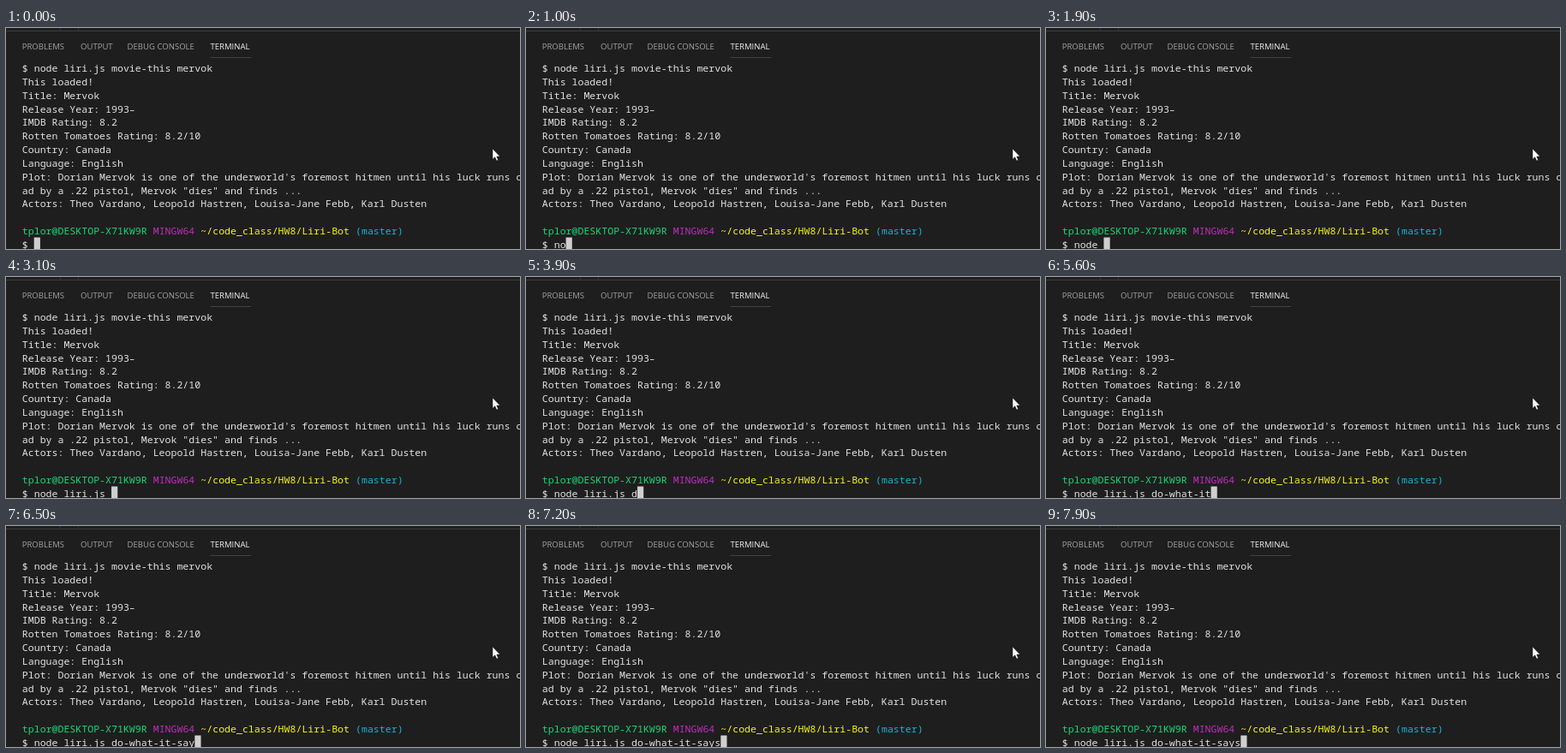
Write an HTML page that moves like this. It is 600 by 258 pixels and loops after 8000 ms.

```html
<!DOCTYPE html>
<html lang="en">
<head>
<meta charset="utf-8">
<title>Terminal</title>
<style>
  html, body { margin: 0; width: 100%; height: 100%; overflow: hidden; background: #1e1e1e; }
  svg { display: block; width: 600px; height: 258px; }
  text { white-space: pre; }
  .tabs { font: 9.55px "Open Sans", "Noto Sans", sans-serif; fill: #a4a4a4; }
  .tabs .active { fill: #f4f4f4; }
  .term { font: 11.583px "Noto Sans Mono", "DejaVu Sans Mono", monospace; fill: #e2e2e2; }
</style>
</head>
<body>
<svg viewBox="0 0 600 258">
  <rect width="600" height="258" fill="#1e1e1e"/>
  <path d="M0 3.5H600" stroke="#3c3c3c"/>
  <path d="M63.5 0V3M84.5 0V3" stroke="#333"/>
  <g class="tabs">
    <text x="18.7" y="24.5">PROBLEMS</text>
    <text x="87" y="24.5">OUTPUT</text>
    <text x="141.6" y="24.5">DEBUG CONSOLE</text>
    <text x="238.5" y="24.5" class="active">TERMINAL</text>
  </g>
  <path d="M238.5 34.5H286" stroke="#424242"/>
  <g class="term" id="term"></g>
  <rect id="caret" y="244.5" width="7.2" height="14" fill="#cfcfcf"/>
  <path d="M568 141V153.3L570.8 150.7L572.7 155L574.6 154.2L572.8 150H576.6Z" fill="#fff" stroke="#111" stroke-width=".5"/>
</svg>
<script>
const LOOP = 8000, LEFT = 18.8, CHAR = 6.95, FIRST = 51.2, PITCH = 15.82;
const COMMAND = "node liri.js do-what-it-says";

// [time in ms, characters typed]
const TYPING = [[420, 0], [920, 2], [1740, 5], [1900, 5], [2620, 13], [3620, 13], [4620, 19], [6420, 27], [6650, 28], [LOOP, 28]];

const OUTPUT = [
  "$ node liri.js movie-this mervok",
  "This loaded!",
  "Title: Mervok",
  "Release Year: 1993–",
  "IMDB Rating: 8.2",
  "Rotten Tomatoes Rating: 8.2/10",
  "Country: Canada",
  "Language: English",
  "Plot: Dorian Mervok is one of the underworld's foremost hitmen until his luck runs out",
  "ad by a .22 pistol, Mervok \"dies\" and finds ...",
  "Actors: Theo Vardano, Leopold Hastren, Louisa-Jane Febb, Karl Dusten"
];
const PROMPT = [
  ["tplor@DESKTOP-X71KW9R", "#18d97a"],
  ["MINGW64", "#c02cc0"],
  ["~/code_class/HW8/Liri-Bot", "#f8f820"],
  ["(master)", "#1ab2d4"]
];

const term = document.getElementById("term");
const caret = document.getElementById("caret");

function addText(content, row, column = 0, color) {
  const el = document.createElementNS("http://www.w3.org/2000/svg", "text");
  el.setAttribute("x", LEFT + column * CHAR);
  el.setAttribute("y", Math.round(FIRST + row * PITCH));
  if (color) el.setAttribute("fill", color);
  el.textContent = content;
  return term.appendChild(el);
}

OUTPUT.forEach((line, row) => addText(line, row));
let column = 0;
for (const [part, color] of PROMPT) {
  addText(part, 12, column, color);
  column += part.length + 1;
}
const input = addText("$ ", 13);

function typedCount(time) {
  const next = TYPING.findIndex(([at]) => time < at);
  if (next <= 0) return 0;
  const [t0, n0] = TYPING[next - 1], [t1, n1] = TYPING[next];
  return Math.floor(n0 + (n1 - n0) * (time - t0) / (t1 - t0) + 1e-6);
}

function render(time) {
  const count = typedCount(time);
  input.textContent = "$ " + COMMAND.slice(0, count);
  caret.setAttribute("x", LEFT + (count + 2) * CHAR);
}

const start = performance.now();
function tick() {
  render((performance.now() - start) % LOOP);
  requestAnimationFrame(tick);
}
tick();
</script>
</body>
</html>
```
